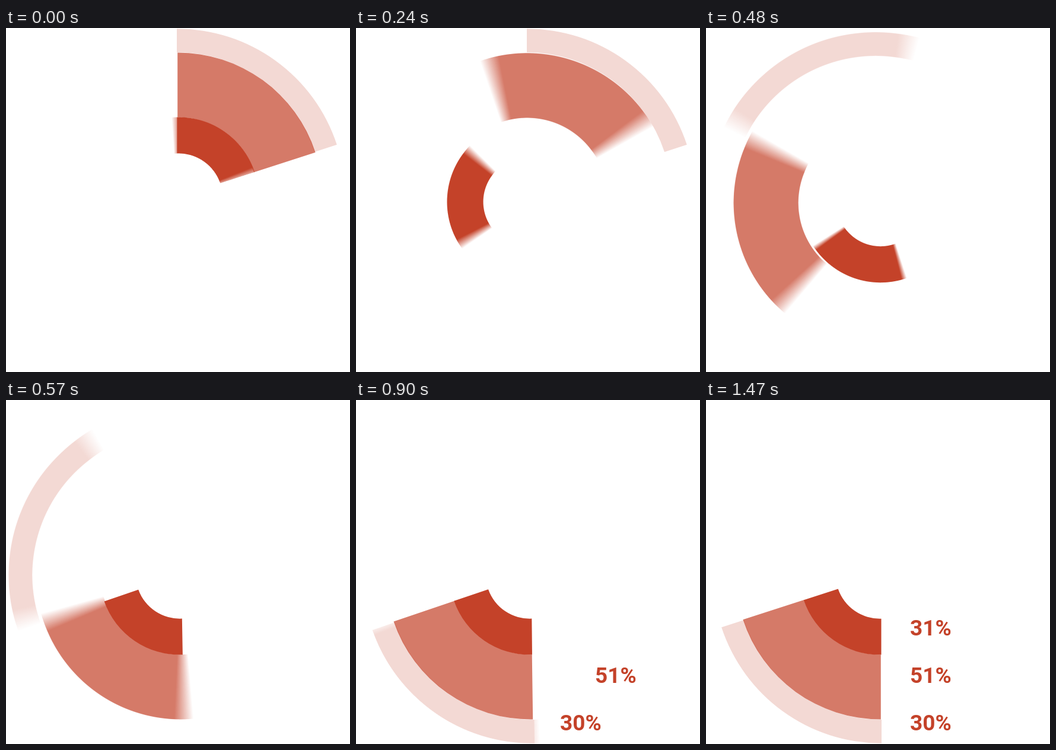
Write an HTML page with a canvas that moves like this. It is 580x580 px and loops after 1620 ms.

```html
<!DOCTYPE html>
<html lang="en">
<head>
<meta charset="utf-8">
<title>Fan chart</title>
<style>
  html, body { margin: 0; width: 580px; height: 580px; overflow: hidden; background: #fff; }
  canvas, svg { position: absolute; left: 0; top: 0; width: 580px; height: 580px; }
  text { font: 700 37px Roboto, sans-serif; fill: #c44229; }
</style>
</head>
<body>
<canvas id="stage" width="580" height="580"></canvas>
<svg viewBox="0 0 580 580">
  <text y="557">30%</text>
  <text y="477">51%</text>
  <text y="397">31%</text>
</svg>
<script>
const SIZE = 580, LOOP = 1620, STEP = 30, LAST = 1470;
const SHUTTER = 15, SAMPLES = 51;
const PIVOT = { x: 292, y: 290 };
const COLOR = '#c44229';
const RAD = Math.PI / 180;

// x, y: arc centre; r, R: radii; lead, trail: sideways shift of the straight edges
const rings = [
  { x: 288,   y: 285.2, r: 244.3, R: 284,   lead: 0,   trail: 0.8, alpha: 0.2, delay: 360 },
  { x: 289.5, y: 285.8, r: 135.3, R: 244.3, lead: 0.3, trail: 0.7, alpha: 0.7, delay: 210 },
  { x: 291,   y: 285.6, r: 74.3,  R: 135.2, lead: 2.5, trail: 1.2, alpha: 1,   delay: 0 }
];

const nodes = document.querySelectorAll('text');
const labels = [
  { start: 587,  fade: 115 },
  { start: 862,  fade: 30 },
  { start: 1020, fade: 30 }
].map((label, i) => ({ ...label, node: nodes[i] }));
const SLIDE = 210, SHIFT = 64, LABEL_X = 344;

const stage = document.getElementById('stage').getContext('2d');
const layer = document.createElement('canvas');
layer.width = layer.height = SIZE;
const mask = layer.getContext('2d');

const clamp = v => Math.min(1, Math.max(0, v));

// Linear swing past the goal, linear return, then a slow settle
function angleAt(time, delay) {
  const keys = [[delay, 0], [delay + 420, 211.4], [delay + 540, 181], [LAST, 180]];
  if (time <= delay) return 0;
  for (let i = 1; i < keys.length; i++) {
    const [t0, a0] = keys[i - 1], [t1, a1] = keys[i];
    if (time < t1) return a0 + (a1 - a0) * (time - t0) / (t1 - t0);
  }
  return 180;
}

function sector({ x, y, r, R, lead, trail }) {
  const from = d => -90 * RAD - Math.asin(lead / d);
  const to = d => -18 * RAD - Math.asin(trail / d);
  const path = new Path2D();
  path.arc(x - PIVOT.x, y - PIVOT.y, R, from(R), to(R));
  path.arc(x - PIVOT.x, y - PIVOT.y, r, to(r), from(r), true);
  path.closePath();
  return path;
}
rings.forEach(ring => { ring.path = sector(ring); });

function drawRing(ring, time) {
  const first = angleAt(time - SHUTTER / 2, ring.delay);
  const last = angleAt(time + SHUTTER / 2, ring.delay);
  const count = Math.abs(last - first) < 0.1 ? 1 : SAMPLES;

  mask.setTransform(1, 0, 0, 1, 0, 0);
  mask.globalAlpha = 1;
  mask.clearRect(0, 0, SIZE, SIZE);

  // Add up the poses within the shutter time, then tint the sum
  mask.globalCompositeOperation = 'lighter';
  mask.globalAlpha = 1 / count;
  mask.fillStyle = '#fff';
  for (let i = 0; i < count; i++) {
    const t = time + SHUTTER * ((i + 0.5) / count - 0.5);
    mask.setTransform(1, 0, 0, 1, PIVOT.x, PIVOT.y);
    mask.rotate(-angleAt(t, ring.delay) * RAD);
    mask.fill(ring.path);
  }
  mask.setTransform(1, 0, 0, 1, 0, 0);
  mask.globalAlpha = 1;
  mask.globalCompositeOperation = 'source-in';
  mask.fillStyle = COLOR;
  mask.fillRect(0, 0, SIZE, SIZE);
  mask.globalCompositeOperation = 'source-over';

  stage.globalAlpha = ring.alpha;
  stage.drawImage(layer, 0, 0);
}

function placeLabel({ node, start, fade }, time) {
  const u = clamp((time - start) / SLIDE);
  node.setAttribute('x', LABEL_X + SHIFT * (1 + Math.cos(Math.PI * u)) / 2);
  node.setAttribute('opacity', clamp((time - start) / fade));
}

let shown = -1;
function render(time) {
  if (time === shown) return;
  shown = time;
  stage.clearRect(0, 0, SIZE, SIZE);
  rings.forEach(ring => drawRing(ring, time));
  labels.forEach(label => placeLabel(label, time));
}

const begin = performance.now();
function tick() {
  const t = Math.max(0, performance.now() - begin) % LOOP;
  render(Math.min(LAST, Math.floor(t / STEP) * STEP));
  requestAnimationFrame(tick);
}
tick();
</script>
</body>
</html>
```
